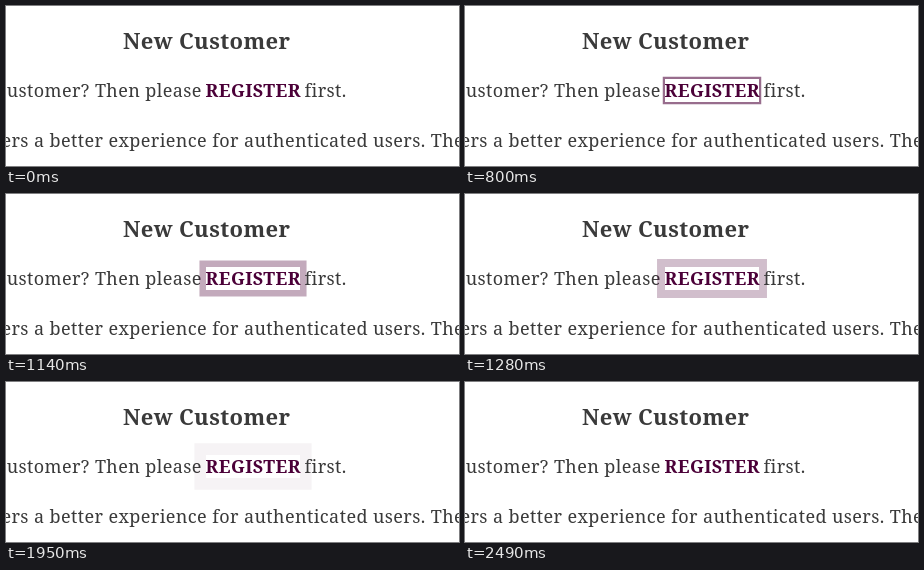
Recreate the animation shown at these times as an HTML page. Size 453 by 160 pixels, loop 3180 ms.

```html
<!DOCTYPE html>
<html lang="en">
<head>
<meta charset="utf-8">
<title>Register pulse</title>
<style>
  html, body { margin: 0; overflow: hidden; background: #fff; }
  svg { display: block; font: 18px "Noto Serif", serif; letter-spacing: 0.4px; fill: #3a3a3a; }
  .end { text-anchor: end; }
  .mid { text-anchor: middle; font-weight: bold; }
  .title { font-size: 22px; }
  .link, #ring { fill: #4b0038; }
</style>
</head>
<body>
<svg width="453" height="160" viewBox="0 0 453 160">
  <text class="mid title" x="200.7" y="43">New Customer</text>
  <text class="end" x="195.8" y="91">customer? Then please</text>
  <path id="ring" fill-rule="evenodd"/>
  <text class="mid link" x="247.2" y="91">REGISTER</text>
  <text x="298.5" y="91">first.</text>
  <text class="end" x="458" y="141">offers a better experience for authenticated users. The</text>
</svg>
<script>
const LOOP = 3180, START = 485, GROW = 2150, SPREAD = 12.5, ALPHA = 0.7;
const box = { x: 200, y: 73, w: 94, h: 23 };
const ring = document.getElementById('ring');

// CSS "ease": cubic-bezier(.25, .1, .25, 1), solved by bisection
function ease(x) {
  let lo = 0, hi = 1;
  for (let i = 0; i < 24; i++) {
    const s = (lo + hi) / 2;
    if (0.75 * s * (1 - s) + s ** 3 < x) lo = s; else hi = s;
  }
  return 0.3 * lo * (1 - lo) ** 2 + 3 * lo * lo * (1 - lo) + lo ** 3;
}

const rect = d =>
  `M${box.x - d} ${box.y - d}h${box.w + 2 * d}v${box.h + 2 * d}h${-box.w - 2 * d}z`;

function draw() {
  const t = (performance.now() % LOOP - START) / GROW;
  const active = t > 0 && t < 1;
  const p = active ? ease(t) : 0;
  ring.setAttribute('d', active ? rect(p * SPREAD) + rect(0) : '');
  ring.setAttribute('fill-opacity', ALPHA * (1 - p));
  requestAnimationFrame(draw);
}
draw();
</script>
</body>
</html>
```
